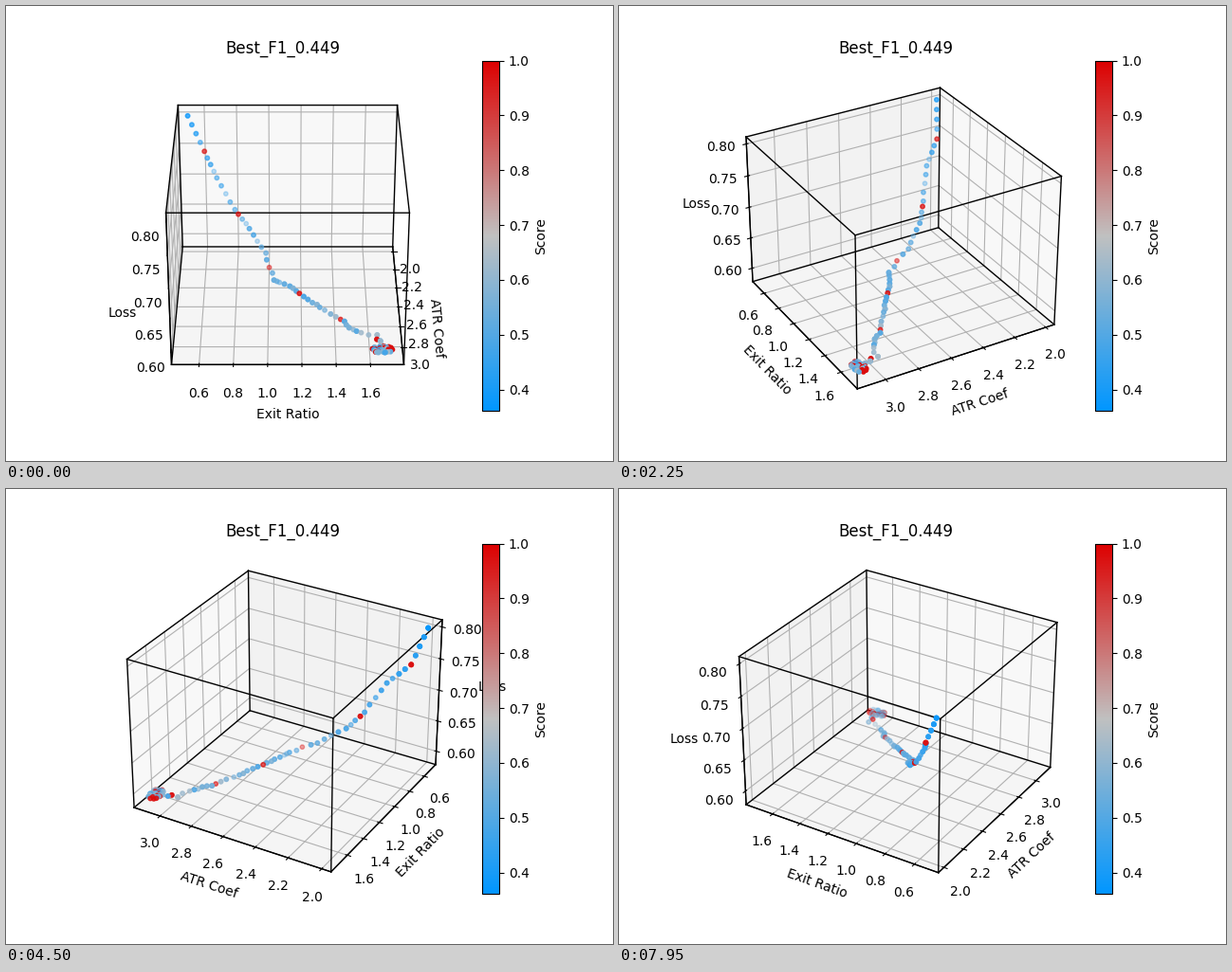
A matplotlib script for the animation above (8 s loop, 640 by 480 pixels).

```python
from itertools import combinations, product

import matplotlib.pyplot as plt
import numpy as np
from matplotlib.animation import FuncAnimation
from matplotlib.colors import LinearSegmentedColormap

TICK_MS = 50
TICKS_PER_STEP = 3
DEGREES_PER_STEP = 4
LOOP_MS = 8000

ATR_LIM = (1.9445, 3.1685)
EXIT_LIM = (0.4390, 1.7950)
LOSS_LIM = (0.5777, 0.8109)

SCORE_MIN = 0.361
STOPS = 52
CLUSTER_SIZE = 36

# Evenly timed key points of the descent: ATR, exit ratio, loss.
PATH = np.array([
    (2.00, 0.50, 0.801), (2.05, 0.60, 0.751), (2.16, 0.68, 0.723),
    (2.24, 0.79, 0.683), (2.31, 0.88, 0.662), (2.44, 0.98, 0.641),
    (2.59, 1.03, 0.620), (2.63, 1.12, 0.617), (2.70, 1.22, 0.610),
    (2.76, 1.31, 0.603), (2.85, 1.43, 0.597), (2.92, 1.50, 0.592),
    (2.97, 1.63, 0.592), (3.07, 1.68, 0.591),
])


def descent(rng):
    """Trials along the path; every stop is visited one to three times."""
    stop = np.repeat(np.arange(STOPS), rng.integers(1, 4, STOPS))
    progress = stop / STOPS
    keys = np.linspace(0, 1, len(PATH))
    wobble = rng.normal(0, 0.008, (STOPS, 2))
    atr, exit_ratio, loss = (np.interp(progress, keys, axis) for axis in PATH.T)
    atr += wobble[stop, 0] * progress
    exit_ratio += wobble[stop, 1] * progress
    score = 0.38 + 0.2 * np.sqrt(progress) + rng.normal(0, 0.06, len(stop)) * progress
    score[stop % 9 == 4] = 0.97
    return np.array([atr, exit_ratio, loss, score])


def cluster(rng):
    """Trials gathered around the optimum, all at nearly the same loss."""
    angle = rng.uniform(0, 2 * np.pi, CLUSTER_SIZE)
    radius = np.sqrt(rng.uniform(0, 1, CLUSTER_SIZE))
    atr = 3.097 + 0.036 * radius * np.cos(angle)
    exit_ratio = 1.672 + 0.06 * radius * np.sin(angle)
    loss = np.full(CLUSTER_SIZE, 0.590)
    score = np.where(np.arange(CLUSTER_SIZE) % 3 == 0, 0.98,
                     rng.uniform(0.45, 0.65, CLUSTER_SIZE))
    return np.array([atr, exit_ratio, loss, score])


def draw_box(ax, *limits):
    """Outline the twelve edges of the plot volume."""
    for start, end in combinations(product(*limits), 2):
        if sum(a != b for a, b in zip(start, end)) == 1:
            ax.plot(*zip(start, end), color="black", lw=1, snap=False)


rng = np.random.default_rng(4)
atr, exit_ratio, loss, score = np.hstack([descent(rng), cluster(rng)])

fig = plt.figure(figsize=(6.4, 4.8), dpi=100)
ax = fig.add_subplot(projection="3d")
cmap = LinearSegmentedColormap.from_list("score", ["#0096ff", "#c0c0c0", "#dd0000"])
points = ax.scatter(atr, exit_ratio, loss, c=score, s=10, cmap=cmap,
                    vmin=SCORE_MIN, vmax=1)
draw_box(ax, ATR_LIM, EXIT_LIM, LOSS_LIM)
ax.set(xlim=ATR_LIM, ylim=EXIT_LIM, zlim=LOSS_LIM,
       xticks=np.linspace(2, 3, 6), yticks=np.linspace(0.6, 1.6, 6),
       zticks=np.linspace(0.6, 0.8, 5),
       xlabel="ATR Coef", ylabel="Exit Ratio", zlabel="Loss",
       title="Best_F1_0.449")
fig.colorbar(points, ax=ax, label="Score")


def update(tick):
    ax.view_init(elev=30, azim=DEGREES_PER_STEP * (tick // TICKS_PER_STEP))
    return []


anim = FuncAnimation(fig, update, frames=LOOP_MS // TICK_MS, interval=TICK_MS,
                     repeat=True, repeat_delay=0, blit=False)
plt.show()
```
